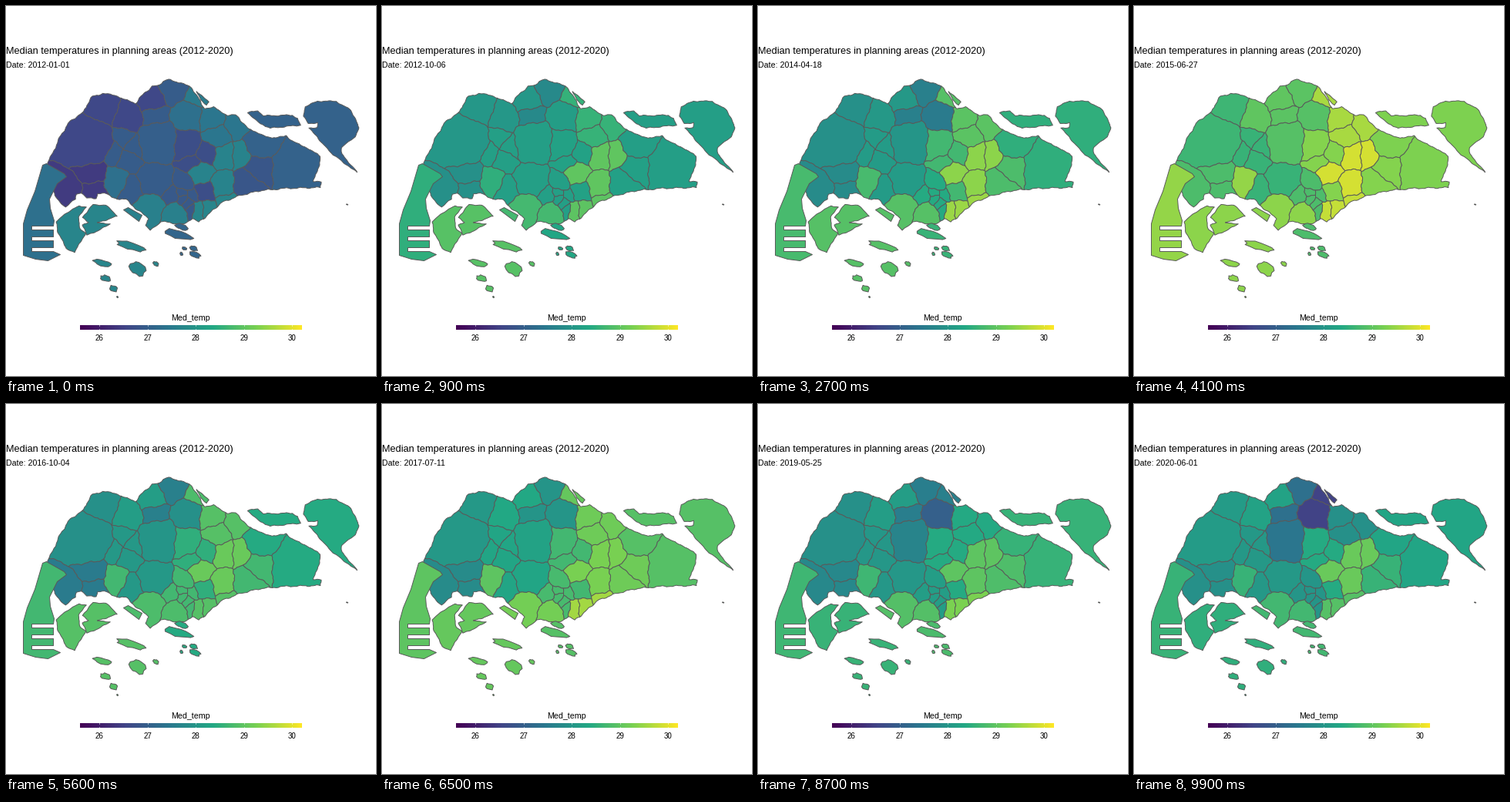
A matplotlib script that plays this animation: 480 px wide and 480 px high, repeating every 10 s.

```python
import numpy as np
import matplotlib.pyplot as plt
from matplotlib.animation import FuncAnimation
from matplotlib.collections import PolyCollection
from matplotlib.colors import LinearSegmentedColormap
from matplotlib.patches import Polygon

SIZE, DPI, FRAMES, STEP = 480, 100, 100, 100
LOW, HIGH = 25.6, 30.2
START = np.datetime64("2012-01-01")
SPAN = int((np.datetime64("2020-06-01") - START).astype(int))
EDGE = dict(edgecolor="#595959", linewidth=0.7)
CMAP = LinearSegmentedColormap.from_list(
    "heat", ["#440154", "#414487", "#2A788E", "#22A884", "#7AD151", "#FDE725"])
rng = np.random.default_rng(4)

# Readings at these frames; between them they follow the yearly cycle.
KEYS = [0, 17, 27, 41, 56, 74, 99]

# Zone: readings, then each area's centre and radius
ZONES = {
    "northwest": ((26.6, 29.1, 27.9, 28.65, 27.9, 27.5, 28.1),
                  [(125, 131, 19), (105, 176, 32)]),
    "docks": ((26.4, 29.0, 27.8, 28.8, 27.5, 27.4, 27.9),
              [(112, 215, 17), (80, 239, 15), (115, 236, 13)]),
    "hills": ((26.95, 29.05, 28.1, 28.6, 28.05, 27.85, 28.05),
              [(137, 192, 12), (153, 169, 9), (169, 182, 12), (158, 201, 13),
               (163, 236, 15), (192, 226, 21)]),
    "west": ((27.3, 29.35, 28.75, 29.45, 28.7, 28.55, 28.6),
             [(143, 226, 16)]),
    "port": ((27.6, 29.5, 28.9, 29.4, 28.8, 28.9, 28.7),
             [(187, 259, 18), (218, 270, 15)]),
    "reserve": ((27.0, 29.0, 28.0, 28.9, 28.0, 27.8, 27.4),
                [(197, 176, 26)]),
    "strait": ((26.6, 29.1, 28.05, 29.0, 28.15, 27.85, 28.25),
               [(159, 143, 17), (188, 121, 17)]),
    "north": ((26.95, 28.3, 27.6, 28.95, 27.6, 27.65, 27.3),
              [(192, 141, 14), (215, 108, 15)]),
    "fields": ((27.3, 28.7, 27.5, 28.9, 27.9, 27.4, 26.5),
               [(235, 143, 18)]),
    "creek": ((27.5, 29.3, 28.9, 29.6, 28.8, 28.6, 26.5),
              [(246, 120, 8)]),
    "northeast": ((27.4, 29.4, 28.95, 29.6, 28.9, 28.7, 27.9),
                  [(267, 146, 16), (296, 154, 14), (274, 168, 16)]),
    "inner": ((26.7, 29.4, 28.7, 29.35, 28.5, 28.2, 28.4),
              [(232, 179, 19), (240, 202, 12), (260, 190, 14),
               (258, 238, 12)]),
    "warm": ((27.65, 30.0, 29.4, 29.9, 29.1, 28.7, 29.1),
             [(283, 194, 15), (304, 194, 14), (252, 217, 15),
              (282, 231, 16)]),
    "shore": ((27.7, 29.9, 29.5, 29.8, 28.9, 29.5, 28.9),
              [(287, 250, 10), (249, 264, 8), (260, 263, 7)]),
    "city": ((26.9, 29.1, 28.4, 28.8, 28.7, 28.1, 28.0),
             [(232, 228, 11), (213, 245, 10), (228, 241, 6), (228, 250, 6),
              (241, 245, 6), (236, 256, 6), (240, 263, 6)]),
    "east": ((26.85, 29.2, 28.8, 29.35, 28.7, 28.9, 28.6),
             [(330, 210, 20), (313, 231, 20)]),
    "coast": ((27.05, 28.95, 28.5, 29.3, 28.4, 28.7, 28.3),
              [(332, 180, 21), (377, 210, 34)]),
    "reef": ((27.7, 29.8, 28.9, 29.4, 28.9, 28.5, 28.5), []),
    "south": ((27.1, 29.2, 28.6, 28.8, 28.4, 28.7, 28.7), []),
}

NORTH_COAST = [
    (52, 207), (62, 186), (72, 165), (80, 152), (100, 137), (104, 128),
    (112, 117), (126, 113), (143, 116), (147, 118), (167, 126), (175, 117),
    (189, 104), (197, 103), (203, 97), (210, 95), (227, 99), (240, 106),
    (248, 117), (257, 132), (268, 131), (287, 141), (297, 141), (314, 158),
    (333, 168), (350, 171), (363, 167), (372, 176), (390, 183), (408, 195),
    (403, 216), (397, 228)]
SOUTH_COAST = [
    (408, 227), (408, 235), (363, 236), (330, 239), (304, 245), (280, 254),
    (260, 272), (249, 280), (242, 275), (230, 283), (200, 279), (187, 291),
    (180, 284), (185, 276), (168, 262), (155, 250), (147, 251), (129, 243),
    (118, 243), (116, 249), (104, 249), (98, 242), (91, 243), (90, 250),
    (76, 260), (62, 246), (60, 215)]


def rough(points, amp=1.0, step=2.5):
    """Split the edges and ripple them; shared borders stay shared."""
    out = []
    points = np.asarray(points, float)
    for a, b in zip(points, np.roll(points, -1, axis=0)):
        n = max(1, int(np.hypot(*(b - a)) / step))
        out.extend(a + (b - a) * np.arange(n)[:, None] / n)
    x, y = np.transpose(out)
    dx = np.sin(0.31 * y + 0.11 * x) + 0.5 * np.sin(0.83 * y)
    dy = np.sin(0.29 * x - 0.13 * y) + 0.5 * np.sin(0.79 * x)
    return np.column_stack([x + amp * dx, y + amp * dy]) + 0.5


def cut(poly, normal, limit):
    """Keep the part of a convex polygon where p . normal <= limit."""
    out = []
    for a, b in zip(poly, np.roll(poly, -1, axis=0)):
        da, db = a @ normal - limit, b @ normal - limit
        if da <= 0:
            out.append(a)
        if da * db < 0:
            out.append(a + (b - a) * da / (da - db))
    return np.array(out)


def cell(i, seeds):
    """Power-diagram cell of one seed."""
    power = (seeds[:, :2] ** 2).sum(axis=1) - seeds[:, 2] ** 2
    poly = np.array([(0, 60), (SIZE, 60), (SIZE, 340), (0, 340)], float)
    for j in range(len(seeds)):
        if j != i:
            poly = cut(poly, 2 * (seeds[j] - seeds[i])[:2], power[j] - power[i])
    return poly


def blob(x, y, rx, ry):
    """Ragged islet leaning to the south-east."""
    a = np.linspace(0, 2 * np.pi, 14, endpoint=False)
    r = rng.uniform(0.75, 1.15, a.size)
    dx = rx * r * np.cos(a)
    return np.column_stack([x + dx, y + ry * r * np.sin(a) + 0.25 * dx]) + 0.5


def piers():
    """Western peninsula with slots between its piers."""
    pts = [(47, 206), (52, 204), (75, 217), (78, 221), (66, 230), (61, 240),
           (56, 250), (57, 262), (62, 278)]
    for y in (285, 299, 313):
        pts += [(61, y), (33, y), (33, y + 5), (61, y + 5)]
    pts += [(70, 322), (54, 330), (38, 328), (22, 323), (22, 282), (27, 264),
            (37, 240)]
    return np.array(pts) + 0.5


isles = [
    ("west", piers()),
    ("port", rough([(152, 264), (158, 261), (176, 271), (172, 279)], 0)),
    ("creek", rough([(247, 110), (263, 124), (260, 128), (252, 121)], 0.4)),
    ("reef", rough([(65, 279), (81, 266), (94, 259), (104, 260), (93, 274),
                    (96, 289), (103, 295), (88, 319), (78, 314), (66, 291)],
                   0.5)),
    ("reef", rough([(98, 274), (113, 257), (129, 258), (144, 272), (130, 277),
                    (118, 281), (134, 282), (119, 291), (104, 297), (99, 284),
                    (107, 280)], 0.5)),
    ("coast", rough([(312, 138), (326, 135), (334, 142), (371, 141),
                     (378, 145), (381, 154), (343, 158), (329, 152)], 0.6)),
    ("coast", rough([(387, 130), (403, 123), (428, 123), (447, 135),
                     (458, 158), (452, 169), (435, 183), (435, 191),
                     (455, 215), (424, 193), (393, 158), (404, 157),
                     (404, 151), (391, 152), (386, 143)], 0.5)),
]
isles += [("reef", blob(*b)) for b in [
    (161, 311, 18, 5), (170, 340, 10, 9), (125, 333, 12, 4), (129, 353, 7, 4),
    (139, 366, 5, 4), (194, 334, 4, 3), (144, 377, 1, 1)]]
isles += [("south", blob(*b)) for b in [
    (223, 296, 18, 6), (227, 286, 8, 4), (231, 314, 3, 2), (243, 314, 5, 3),
    (245, 322, 7, 4), (227, 321, 2, 2), (442, 257, 1, 0.5)]]

names = [z for z, (_, seeds) in ZONES.items() for _ in seeds]
seeds = np.array([s for _, group in ZONES.values() for s in group], float)
cells = [rough(cell(i, seeds)) for i in range(len(seeds))]


def season(frame):
    """Yearly cycle: cool around January, hottest in May and June."""
    month = SPAN * np.asarray(frame) / (FRAMES - 1) / 30.44 + 0.5
    turn = 2 * np.pi * month / 12
    return 27.9 - 0.85 * np.cos(turn - 0.1) - 0.2 * np.cos(2 * turn - 0.52)


def colors(frame):
    """Fill colour of every zone."""
    result = {}
    for zone, (temps, _) in ZONES.items():
        t = season(frame) + np.interp(frame, KEYS, temps - season(KEYS))
        result[zone] = CMAP(np.clip((t - LOW) / (HIGH - LOW), 0, 1))
    return result


fig = plt.figure(figsize=(SIZE / DPI, SIZE / DPI), dpi=DPI, facecolor="white")
ax = fig.add_axes([0, 0, 1, 1])


def label(x, y, text, px, ha="left"):
    return ax.text(x, y, text, fontsize=px * 72 / DPI, ha=ha, va="baseline",
                   family="Liberation Sans", color="black")


label(0, 62, "Median temperatures in planning areas (2012-2020)", 12.8)
date_text = label(0, 80, "", 10.6)
label(239.5, 408, "Med_temp", 10.6, "center")

ax.imshow(np.linspace(0, 1, 288)[None], cmap=CMAP, aspect="auto",
          extent=(96, 384, 420, 414))
for t in range(26, 31):
    x = 96 + 288 * (t - LOW) / (HIGH - LOW)
    ax.vlines([x, x], [414, 418.8], [415.2, 420], color="white", lw=0.72)
    label(x, 434, str(t), 9.8, "center")

shore = Polygon(rough(NORTH_COAST + SOUTH_COAST, 0.7), fill=False, **EDGE)
ax.add_patch(shore)
mainland = PolyCollection(cells, **EDGE)
ax.add_collection(mainland)
mainland.set_clip_path(shore)
shore.set_zorder(2)
islands = PolyCollection([p for _, p in isles], zorder=3, **EDGE)
ax.add_collection(islands)
ax.set(xlim=(0, SIZE), ylim=(SIZE, 0))
ax.axis("off")


def draw(frame):
    fill = colors(frame)
    mainland.set_facecolor([fill[z] for z in names])
    islands.set_facecolor([fill[z] for z, _ in isles])
    date_text.set_text(f"Date: {START + int(SPAN * frame / (FRAMES - 1))}")
    return mainland, islands, date_text


anim = FuncAnimation(fig, draw, frames=FRAMES, interval=STEP, repeat=True,
                     repeat_delay=0)
plt.show()
```
